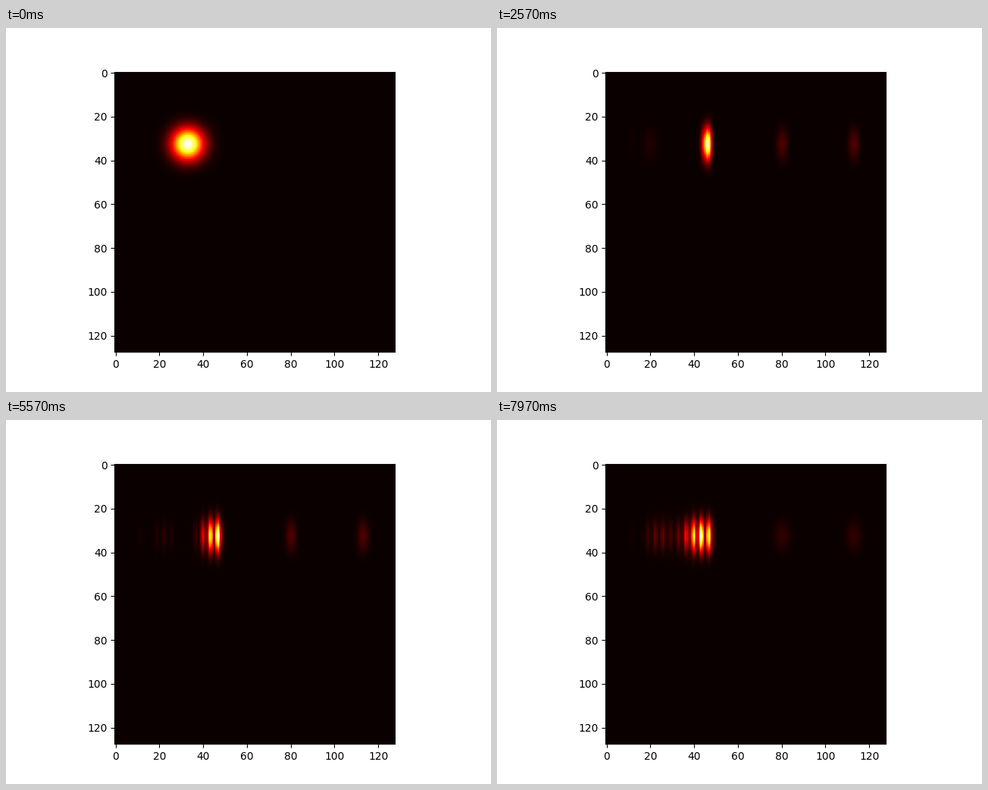
Recreate the animation shown at these times as a matplotlib script. Size 640 by 480 pixels, loop 8 s.

```python
import numpy as np
import matplotlib.pyplot as plt
from matplotlib.animation import FuncAnimation

N = 128
FRAMES = 240
SIGMA = 5        # height of the packet, and its width at the start
WALL = 49        # right edge that reflects the packet
SPACING = 3.5    # distance between interference fringes
WELLS = [80.2, 113]
x = np.arange(N)

# Packet centre and width at a few moments.
TIMES = [0, 50, 101, 133, 167, 210, 239]
CENTRES = [33, 45.3, 46.5, 43.4, 46, 47.3, 43.8]
WIDTHS = [SIGMA, 1.65, 1.25, 2.4, 4.1, 3, 5.4]

standing = np.sin(np.pi * (WALL - 0.5 - x) / SPACING) ** 2


def hump(centre, width):
    return np.exp(-((x - centre) / width) ** 2 / 2)


def edge(at):
    """Soft step from 1 to 0."""
    return 1 / (1 + np.exp(np.clip((x - at) / 0.3, -50, 50)))


def ramp(n, start, end):
    return np.clip((n - start) / (end - start), 0, 1)


def ease(n, values):
    """Smoothstep between the key moments."""
    i = np.clip(np.searchsorted(TIMES, n, "right") - 1, 0, len(TIMES) - 2)
    s = ramp(n, TIMES[i], TIMES[i + 1])
    return values[i] + (values[i + 1] - values[i]) * s * s * (3 - 2 * s)


def profile(n):
    """Density along x, scaled to a peak of one."""
    centre, width = ease(n, CENTRES), ease(n, WIDTHS)
    contrast = 0.85 * ramp(n, 50, 133)
    fringes = 1 - contrast + contrast * standing
    packet = hump(centre, width) * fringes * edge(max(WALL, 60 - 0.25 * n))
    packet /= packet.max()

    # The part that leaks out depends on how close the packet is to the wall.
    age = n / (FRAMES - 1)
    near = ramp(centre, 43, 47)
    behind = (0.03 + 0.15 * (1 - near) * age) * fringes
    behind *= hump(18 + 6 * age, 1.4 + 3 * age) * (1 - edge(15.5))
    behind += 0.015 * hump(11.5, 1.5)
    ahead = (0.04 + 0.09 * near) * sum(hump(c, 2.7 - 1.3 * near)
                                       for c in WELLS)
    row = packet + ramp(n, 0, 25) * (behind + ahead)
    return row / row.max()


def density(n):
    return np.outer(hump(32.7, SIGMA), profile(n))


fig, ax = plt.subplots(figsize=(6.4, 4.8), dpi=100)
image = ax.imshow(density(0), cmap="hot", vmin=0, vmax=1)


def update(n):
    image.set_data(density(n))
    return [image]


anim = FuncAnimation(fig, update, frames=FRAMES, interval=8000 / FRAMES,
                     repeat=True, repeat_delay=0)
plt.show()
```
